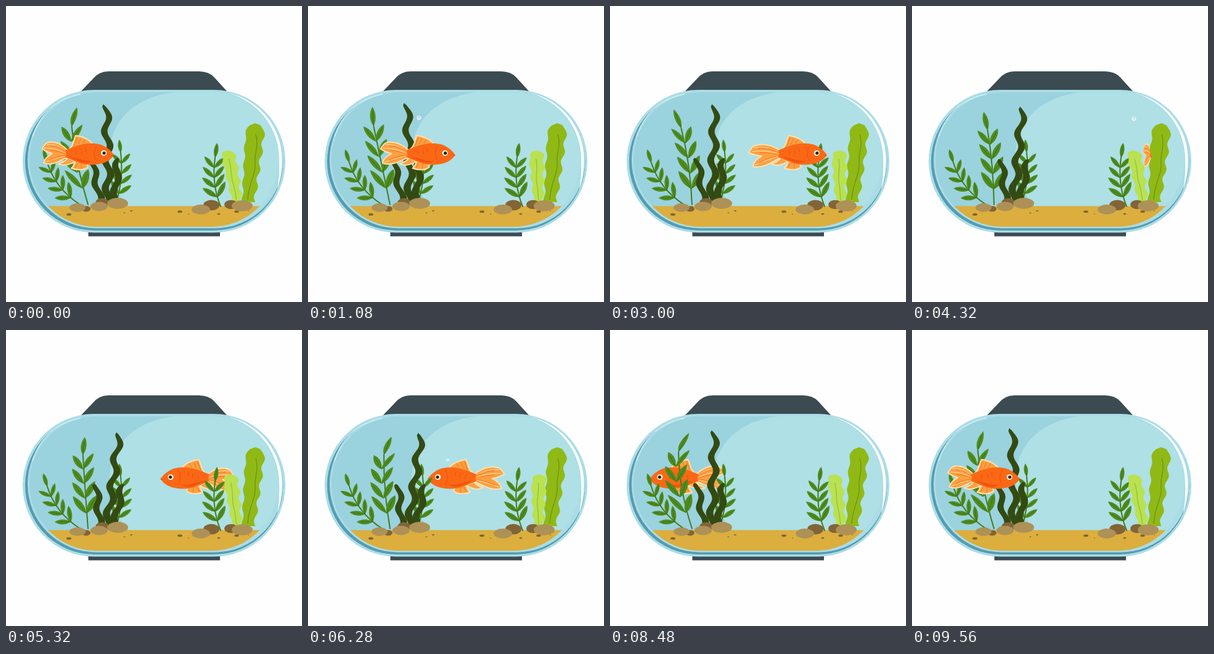
These frames come from a looping animation (480x480 px, 9600 ms). An HTML page:

```html
<!DOCTYPE html>
<html lang="en">
<head>
<meta charset="utf-8">
<title>Fish tank</title>
<style>
html, body { margin: 0; width: 100%; height: 100%; overflow: hidden; background: #fefefe; }
svg { display: block; width: 100%; height: 100%; }
.leaf { fill: #4f8c1e; }
.stem { fill: none; stroke: #437a1a; stroke-width: 2; stroke-linecap: round; }
.rib { fill: none; stroke: #376812; stroke-width: .8; }
.fin { fill: #fba043; stroke: #fee2ae; stroke-width: 2; stroke-linejoin: round; }
.ray { fill: none; stroke: #f47a22; stroke-width: 1.2; stroke-linecap: round; }
.glow { fill: none; stroke: #fdd596; stroke-width: 1.2; stroke-linecap: round; }
.stone { fill: #ad9156; }
.dark { fill: #826436; }
</style>
</head>
<body>
<svg viewBox="0 0 480 480">
  <clipPath id="inside"><rect x="38" y="140" width="404" height="218" rx="109"/></clipPath>

  <path fill="#3c4b52" d="M122 138L141 118Q151 106 166 106H313Q329 106 338 116L358 138Z"/>
  <rect x="133.500" y="362" width="213.500" height="11.500" fill="#3c4b52"/>
  <rect x="27" y="136" width="426" height="231.500" rx="115.750" fill="#abdde6"/>
  <rect x="31" y="140" width="418.500" height="224" rx="112" fill="#559bb3"/>
  <rect x="35" y="139" width="414.500" height="221.500" rx="110.750" fill="#aadce5"/>
  <g clip-path="url(#inside)">
    <rect x="38" y="140" width="404" height="218" fill="#aee0e6"/>
    <path fill="#9ad2de" d="M272 140C215 147 168 180 168 245C168 285 184 310 200 326H30V140Z"/>
    <rect x="38" y="324.500" width="404" height="36" fill="#dbae3e"/>
  </g>
  <path fill="none" stroke="#d5f0f4" stroke-width="1.300" d="M43 212C54 176 82 150 121 143"/>
  <path fill="#fff" d="M360 141A110 110 0 0 1 447.500 250Q447.500 275 440 298Q444 275 443 248A112 112 0 0 0 360 141Z"/>

  <g id="under"></g>
  <g id="plants"></g>
  <g id="stones"></g>
  <g id="over"></g>
  <g id="bubbles"></g>

  <g id="fish">
    <g id="tail">
      <path class="fin" d="M-15 -5C-28 -15 -42 -21 -57 -16C-61 -14 -63 -10 -66 -6C-61 -3 -53 0 -46 1C-56 6 -60 12 -61 17C-46 22 -30 12 -15 5Z"/>
      <path class="glow" d="M-20 -4C-34 -12 -46 -15 -57 -13M-21 -1C-36 -7 -48 -8 -61 -7M-20 3C-34 7 -46 11 -57 15"/>
      <path class="ray" d="M-19 -3C-32 -10 -42 -12 -50 -11M-20 0C-32 -3 -42 -4 -49 -4M-19 2C-32 4 -42 7 -50 12"/>
    </g>
    <path class="fin" d="M-16 6C-19 12 -26 14 -31 16C-22 20 -12 17 -4 12Z"/>
    <path class="fin" d="M-4 12C-5 19 -8 21 -10 23C0 27 12 26 17 21L14 14Z"/>
    <path class="fin" d="M-15 -7C-6 -13 -7 -23 -3 -30C9 -28 20 -23 25 -15Z"/>
    <path class="ray" d="M-6 -13L-1 -26M1 -16L5 -25M8 -17L12 -23M0 15L-4 22M6 15L6 23"/>
    <path fill="#fb6815" d="M59 1C51 -9 42 -16 28 -17C8 -19 -8 -11 -20 -6Q-17 0 -20 5C-8 10 6 18 24 17.500C42 17 54 11 59 1Z"/>
    <path fill="#f0530f" d="M-14 4C0 6 13 13 25 11C20 15 12 15 5 13C-2 10 -8 7 -14 4Z"/>
    <path fill="none" stroke="#ea4d10" d="M31 -13C25 -5 26 6 32 12M5 -7Q9 -4 6 0M12 -10Q16 -7 13 -3M-3 -5Q0 -2 -3 1"/>
    <circle cx="42.500" cy="-1.500" r="4.600" fill="#fff4dc"/>
    <circle cx="43" cy="-1.500" r="2.600" fill="#25282a"/>
    <path stroke="#d9480c" d="M55 3L59 2"/>
  </g>
</svg>
<script>
const LOOP = 9.6, TAU = 2 * Math.PI;
const $ = id => document.getElementById(id);
const fish = $('fish'), plants = $('plants');

function add(parent, tag, attrs) {
  const el = document.createElementNS('http://www.w3.org/2000/svg', tag);
  for (const k in attrs) el.setAttribute(k, attrs[k]);
  parent.append(el);
  return el;
}
const pt = (x, y) => x.toFixed(2) + ' ' + y.toFixed(2);
const group = () => add(plants, 'g', {});

function leaf(g, x, y, angle, len) {
  const c = Math.cos(angle), s = Math.sin(angle), w = len * .2;
  const at = (a, b) => pt(x + a * c - b * s, y + a * s + b * c);
  add(g, 'path', { class: 'leaf', d:
    `M${at(0, 0)}C${at(len * .3, -w)} ${at(len * .7, -w)} ${at(len, 0)}C${at(len * .7, w)} ${at(len * .3, w)} ${at(0, 0)}Z` });
  add(g, 'path', { class: 'rib', d: `M${at(0, 0)}L${at(len * .8, 0)}` });
}

// Paired leaves along a quadratic stem
function plant([x0, y0], [x1, y1], [x2, y2], len, spread) {
  const g = group(), pairs = 4, from = .2;
  add(g, 'path', { class: 'stem', d: `M${pt(x0, y0)}Q${pt(x1, y1)} ${pt(x2, y2)}` });
  for (let i = 0; i <= pairs; i++) {
    const u = from + (1 - from) * i / pairs, v = 1 - u;
    const x = v * v * x0 + 2 * u * v * x1 + u * u * x2;
    const y = v * v * y0 + 2 * u * v * y1 + u * u * y2;
    const a = Math.atan2(v * (y1 - y0) + u * (y2 - y1), v * (x1 - x0) + u * (x2 - x1));
    if (i === pairs) leaf(g, x, y, a, len * .9);
    else for (const side of [-1, 1]) leaf(g, x, y, a + side * spread, len * (1.05 - .05 * i));
  }
  return g;
}

// Wavy band from root to tip; ripple roughens the two edges separately
function ribbon(g, [x0, y0], [x1, y1], fill, { root, top, waves, phase = 0, bow = 0, ripple = 0 }) {
  const left = [], right = [], n = 40;
  for (let i = 0; i <= n; i++) {
    const u = i / n, y = y0 + (y1 - y0) * u, a = phase + u * waves * TAU;
    const x = x0 + (x1 - x0) * u + bow * Math.sin(a);
    const w = (root + (top - root) * u) / 2, round = Math.sqrt(1 - u ** 16);
    left.push(pt(x - round * (w + ripple * Math.sin(a)), y));
    right.unshift(pt(x + round * (w + ripple * Math.sin(a + 2)), y));
  }
  add(g, 'path', { fill, d: 'M' + left.concat(right).join('L') + 'Z' });
}

function midrib(g, stroke, d) {
  add(g, 'path', { fill: 'none', stroke, 'stroke-width': 1.4, d });
}

plant([120, 322], [80, 296], [67, 254], 25, .72);
const fern = plant([133, 322], [132, 260], [125, 203], 33, .6);
plant([178, 320], [191, 282], [186, 238], 24, .75);
plant([348, 325], [333, 288], [339, 246], 27, .75);

const weed = group(), olive = '#334a12';
ribbon(weed, [165, 316], [180, 161], olive, { root: 12, top: 10, waves: 3.4, phase: 1.94, bow: 4.5 });
ribbon(weed, [152, 314], [145, 247], olive, { root: 11, top: 9, waves: 1.6, phase: 1, bow: 3.5 });
ribbon(weed, [176, 316], [188, 247], olive, { root: 12, top: 10, waves: 1.6, phase: 2.6, bow: 3.5 });

const tall = group();
ribbon(tall, [393, 318], [405, 190], '#90b916', { root: 20, top: 32, waves: 4.5, phase: 1, ripple: 2.5, bow: 1 });
midrib(tall, '#6c9614', 'M405 208C411 226 402 240 404 254C406 272 393 287 392 314');

const pale = group();
ribbon(pale, [374, 319], [368, 234], '#b9e150', { root: 15, top: 25, waves: 4, phase: 2, ripple: 2.2, bow: .8 });
midrib(pale, '#96c23c', 'M368 248C372 264 367 276 371 290C373 300 373 308 374 316');

function stone(x, y, r, flat, kind) {
  add($('stones'), 'ellipse', { cx: x, cy: y, rx: r, ry: r * flat, class: kind });
}
for (const [x, y, r] of [[130, 329, 7], [156, 319, 11], [333, 323, 13], [365, 322, 11]]) stone(x, y, r, .66, 'dark');
for (const [x, y, r] of [[116, 327, 13], [151, 325, 14], [181, 320, 17], [316, 330, 15], [383, 324, 17]]) stone(x, y, r, .53, 'stone');
[102, 192, 203, 282, 296, 345, 374, 393].forEach((x, i) =>
  stone(x, 335 + 3 * Math.cos(i * 1.4), 2.5 + 1.5 * Math.cos(i * 2.2), .5, 'dark'));

// Shifts every point of a group by its height above the root
function bend(g, root, height, shift) {
  for (const p of g.children) {
    p.rest ??= p.getAttribute('d');
    p.setAttribute('d', p.rest.replace(/(-?[\d.]+) (-?[\d.]+)/g, (_, x, y) => {
      const [dx, dy] = shift(Math.max(0, (root - y) / height));
      return pt(+x + dx, +y + dy);
    }));
  }
}

const wave = (t, mean, size, peak, period = LOOP) => mean + size * Math.cos((t - peak) / period * TAU);
const turn = (t, a, b) => Math.cos(Math.PI * Math.min(1, Math.max(0, (t - a) / (b - a))));

const SPEED = 58.9, RISE = 55;
const bubbles = [[.05, 180], [3.32, 360], [5.78, 226.5]].map(([start, x]) => {
  const el = add($('bubbles'), 'g', { fill: 'none', stroke: '#f4fcfd', 'stroke-linecap': 'round' });
  add(el, 'circle', { r: 4.2, 'stroke-width': 1.2 });
  add(el, 'path', { d: 'M-1.500 -1.800A2.200 2.200 0 1 0 2 -.5', 'stroke-width': 1.5 });
  return { el, start, x };
});

function swim(t) {
  const facing = t < 6 ? turn(t, 4.22, 4.47) : -turn(t, 8.76, 9);
  const right = 116 + SPEED * t, left = 623 - SPEED * t, drift = 20 + 10 * t;
  const swing = t < 6 ? 26 * (1 - facing * facing) : 0;
  const x = Math.min(right, Math.max(left, drift)) + swing;
  const layer = t > 4.3 && t < 8.88 ? $('under') : $('over');
  if (fish.parentNode !== layer) layer.append(fish);
  fish.setAttribute('transform', `translate(${x} 240) scale(${facing} 1)`);
  const tilt = wave(t, 0, 4, 0, LOOP / 8), stretch = wave(t, .95, -.11, 0, LOOP / 2);
  $('tail').setAttribute('transform', `translate(-16 0) rotate(${tilt}) scale(${stretch} 1) translate(16 0)`);
}

function draw(t) {
  // The fern bows at its middle and its tip separately
  const mid = wave(t, -11.5, 10.5, 4.4), tip = wave(t, -3, 18, 6.9), drop = wave(t, -5, 5, 5.6);
  const a = (mid - .275 * tip) / .375;
  bend(fern, 322, 148, h => [a * h + (tip - a) * h ** 3, drop * h]);

  const lean = wave(t, -8, 12, 5.7), sink = wave(t, 1, 5, 6.3);
  bend(weed, 316, 155, h => [lean * h ** 1.2, sink * h]);

  const flop = wave(t, 0, 10, 2.1, LOOP / 2);
  bend(pale, 318, 85, h => [flop * h ** 1.4, 0]);

  swim(t);

  for (const { el, start, x } of bubbles) {
    const age = t - start, u = age / 1.84;
    el.style.display = u >= 0 && u < 1 ? '' : 'none';
    el.setAttribute('transform', `translate(${x} ${238 - RISE * age}) scale(${Math.min(1, .35 + .75 * u)})`);
  }
}

function tick() {
  draw(performance.now() / 1000 % LOOP);
  requestAnimationFrame(tick);
}
tick();
</script>
</body>
</html>
```
